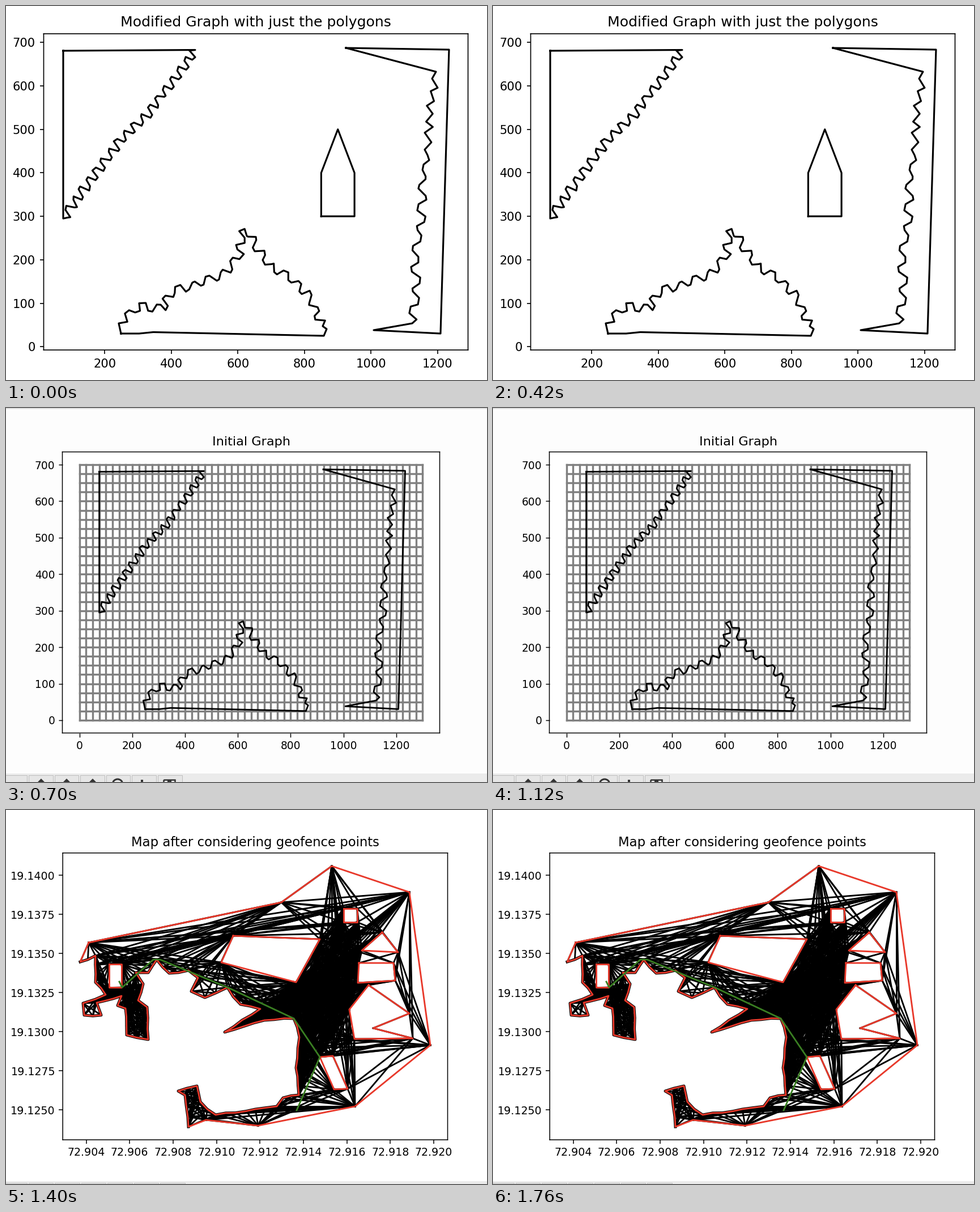
A matplotlib script that plays this animation: 849x660 px, repeating every 2 s.

```python
import numpy as np
import matplotlib.pyplot as plt
from matplotlib.animation import FuncAnimation
from matplotlib.collections import LineCollection

W, H, DPI = 849, 660, 100
plt.rcParams["font.family"] = "DejaVu Sans"
fig = plt.figure(figsize=(W / DPI, H / DPI), dpi=DPI, facecolor="white")


def pts(*flat):
    return np.array(flat, float).reshape(-1, 2)


def closed(p):
    return np.vstack([p, p[:1]])


def px(width):
    return width * 72 / DPI


def panel(box, scale, title, xlim, ylim, xticks, yticks):
    """Axes with default plot styling, enlarged by scale; box is in pixels."""
    x0, y0, x1, y1 = box
    ax = fig.add_axes([x0 / W, 1 - y1 / H, (x1 - x0) / W, (y1 - y0) / H])
    ax.set(xlim=xlim, ylim=ylim, xticks=xticks, yticks=yticks)
    ax.set_title(title, fontsize=12 * scale, pad=6 * scale)
    ax.tick_params(labelsize=10 * scale, length=3.5 * scale,
                   width=0.8 * scale, pad=3.5 * scale)
    for spine in ax.spines.values():
        spine.set_linewidth(0.8 * scale)
        spine.set_snap(False)
    return ax


def stage():
    ax = fig.add_axes([0, 0, 1, 1], zorder=-1)
    ax.set(xlim=(0, W), ylim=(H, 0))
    ax.axis("off")
    return ax


def toolbar(ax, top, step):
    """Upper rim of the window's button bar."""
    ax.add_patch(plt.Rectangle((0, top), W, H - top, color="#ebebeb", lw=0))
    for i in range(7):
        x = 40 + (i - 1) * step
        ax.add_patch(plt.Rectangle((x, top + 3), step - 3, 40, fc="#e6e6e6",
                                   ec="#bdbdbd", lw=px(1)))


# Shoreline polygons: smooth key lines, roughened into teeth

CASTLE, ZIGZAG = (1, 1, -1, -1), (1, -1)


def ragged(keys, step, amp, teeth, seed):
    """Points along a line, pushed to either side in the rhythm of teeth."""
    rng = np.random.default_rng(seed)
    dist = np.r_[0, np.cumsum(np.hypot(*np.diff(keys, axis=0).T))]
    n = int(dist[-1] / step)
    at = np.linspace(0, dist[-1], n + 1)
    at[1:-1] += rng.uniform(-0.3, 0.3, n - 1) * step
    path = np.column_stack([np.interp(at, dist, k) for k in keys.T])
    dx, dy = np.gradient(path, axis=0).T
    normal = np.column_stack([-dy, dx]) / np.hypot(dx, dy)[:, None]
    push = amp * np.resize(teeth, n + 1) * rng.uniform(0.5, 1, n + 1)
    push[[0, -1]] = 0
    return path + normal * push[:, None]


west = np.vstack([
    pts(101, 79),
    ragged(pts(334, 77.5, 308, 115, 253, 187, 200, 240, 155, 300, 101, 375),
           5.2, 9, CASTLE, 4)])
south = np.vstack([
    pts(203, 578, 235, 578, 260, 575.5, 561, 582, 566, 570),
    ragged(pts(559, 565, 538, 515, 508, 485, 465, 458, 438, 420, 430, 400,
               416, 400, 412, 440, 390, 470, 340, 490, 292, 503, 276, 535,
               234, 530, 199, 560), 7, 8, CASTLE, 7)])
east = np.vstack([
    pts(600, 74, 782, 77, 767, 578, 649, 572),
    ragged(pts(717, 560, 725, 500, 721, 440, 732, 390, 736, 300, 747, 272),
           9, 8, CASTLE, 2),
    ragged(pts(744, 263, 747, 190, 759, 116), 12, 7.5, ZIGZAG, 3)])
shores = [(closed(p) - (57, 601.3)) / (0.5875, -0.7673)
          for p in (west, south, east)]
house = closed(pts(850, 300, 850, 400, 900, 500, 950, 400, 950, 300))


def polygons_view():
    s = 1.51
    ax = panel((66.5, 49, 815.5, 607), s,
               "Modified Graph with just the polygons",
               (16.2, 1291.1), (-7.4, 719.8),
               range(200, 1201, 200), range(0, 701, 100))
    for p in shores + [house]:
        ax.plot(*p.T, color="black", lw=1.5 * s)
    return [ax]


def grid_view():
    s = 1.342
    back = stage()
    back.add_patch(plt.Rectangle((0, 0), W, H, color="#fdfdfd", lw=0))
    back.plot([0, W], [0.5, 0.5], color="#dadada", lw=px(1.5))
    toolbar(back, 645, 45.6)
    dark = dict(color="#333333", lw=0)
    for x in (62, 107, 153):
        back.add_patch(plt.Polygon([(x - 7, 661), (x, 654), (x + 7, 661)],
                                   **dark))
    back.add_patch(plt.Circle((197, 664), 9, fill=False, ec="#333333",
                              lw=px(3)))
    back.add_patch(plt.Rectangle((238, 656), 4, 5, **dark))
    back.add_patch(plt.Rectangle((278, 656), 20, 6, fill=False,
                                 ec="#333333", lw=px(2.5)))
    back.add_patch(plt.Rectangle((285, 656), 7, 5, **dark))

    ax = panel((99.5, 77.5, 765.5, 573.5), s, "Initial Graph",
               (-65, 1365), (-35, 735),
               range(0, 1201, 200), range(0, 701, 100))
    grid = [[(x, 0), (x, 700)] for x in range(0, 1301, 25)]
    grid += [[(0, y), (1300, y)] for y in range(0, 701, 25)]
    ax.add_collection(LineCollection(grid, colors="gray", lw=px(3.4),
                                     capstyle="projecting"))
    for p in shores:
        ax.plot(*p.T, color="black", lw=1.5 * s)
    return [back, ax]


# Geofence map: open side, rough coast and blocked areas, in stage pixels

def roughen(keys, step, jitter, seed):
    """Keep the key points and add slightly shaken ones between them."""
    rng = np.random.default_rng(seed)
    out = []
    for a, b in zip(keys, keys[1:]):
        n = max(1, round(np.hypot(*(b - a)) / step))
        out.append(a)
        out += [a + (b - a) * k / n + rng.uniform(-jitter, jitter, 2)
                for k in range(1, n)]
    return np.array(out + [keys[-1]])


open_side = pts(146, 234, 486, 163, 575, 99, 712, 145, 749, 415, 616, 523,
                445, 557, 353, 547)
coast = roughen(pts(
    322, 559, 316, 503, 304, 496, 337, 487, 343, 515, 370, 538, 440, 528,
    478, 523, 489, 508, 517, 503, 512, 455, 518, 401, 508, 368, 456, 371,
    386, 392, 449, 351, 414, 343, 391, 313, 351, 331, 327, 320, 339, 296,
    322, 283, 288, 288, 266, 264, 251, 287, 229, 287, 242, 307, 233, 336,
    249, 348, 251, 405, 213, 397, 211, 350, 197, 345, 204, 328, 160, 340,
    168, 362, 138, 362, 136, 341, 176, 326, 158, 304, 158, 257, 131, 268),
    18, 1.5, 5)
fence = np.vstack([open_side, coast])


def rect(x, y, w, h):
    return pts(x, y, x + w, y, x + w, y + h, x, y + h)


blocks = [
    rect(182, 272, 22, 41),
    rect(596, 174, 24, 24),
    pts(401, 222, 554, 228, 512, 304, 380, 269),
    pts(664, 216, 692, 251, 628, 248),
    pts(623, 270, 684, 270, 687, 301, 621, 305),
    pts(640, 309, 712, 359, 648, 385, 718, 403, 615, 404, 606, 352),
    pts(554, 436, 577, 434, 603, 492, 579, 493),
]
route = pts(200, 303, 205, 313, 260, 264, 272, 264, 391, 313, 508, 368,
            554, 436, 513, 530)


def side(a, b, c):
    return ((b[..., 0] - a[..., 0]) * (c[..., 1] - a[..., 1])
            - (b[..., 1] - a[..., 1]) * (c[..., 0] - a[..., 0]))


def sight_lines(polys):
    """All vertex pairs that see each other inside the fence."""
    starts = np.vstack(polys)
    ends = np.vstack([np.roll(p, -1, axis=0) for p in polys])
    lines = []
    for i, a in enumerate(starts):
        from_a = side(starts, ends, a)
        for b in starts[i + 1:]:
            cross = ((from_a * side(starts, ends, b) < 0)
                     & (side(a, b, starts) * side(a, b, ends) < 0))
            if cross.any():
                continue
            mx, my = (a + b) / 2
            span = (starts[:, 1] > my) != (ends[:, 1] > my)
            s, e = starts[span], ends[span]
            hits = s[:, 0] + (my - s[:, 1]) * (e - s)[:, 0] / (e - s)[:, 1]
            if (hits > mx).sum() % 2:
                lines.append((a, b))
    return np.array(lines)


def map_view():
    s = 1.369
    back = stage()
    toolbar(back, 655, 46.5)

    def geo(p):
        return (p - (141.5, 115.5)) / (38350, -27567) + (72.904, 19.14)

    box = (100.2, 75.8, 779.5, 582)
    (x0, y1), (x1, y0) = geo(pts(*box))
    ax = panel(box, s, "Map after considering geofence points",
               (x0, x1), (y0, y1),
               72.904 + 0.002 * np.arange(9), 19.125 + 0.0025 * np.arange(7))
    ax.xaxis.set_major_formatter("{x:.3f}")
    ax.yaxis.set_major_formatter("{x:.4f}")

    polys = [fence] + blocks
    ax.add_collection(LineCollection(geo(sight_lines(polys)), colors="black",
                                     lw=1.5 * s, capstyle="projecting"))
    ax.plot(*geo(coast).T, color="black", lw=2.6 * s)
    for p in polys:
        ax.plot(*geo(closed(p)).T, color="#e8382a", lw=1.5 * s, zorder=3)
    ax.plot(*geo(route).T, color="#3a7f22", lw=1.5 * s, zorder=4)
    return [back, ax]


views = [polygons_view(), grid_view(), map_view()]


def update(i):
    current = min(i // 7, 2)
    for k, axes in enumerate(views):
        for ax in axes:
            ax.set_visible(k == current)
    return []


anim = FuncAnimation(fig, update, frames=20, interval=100, repeat=True,
                     repeat_delay=0, blit=False)
plt.show()
```
